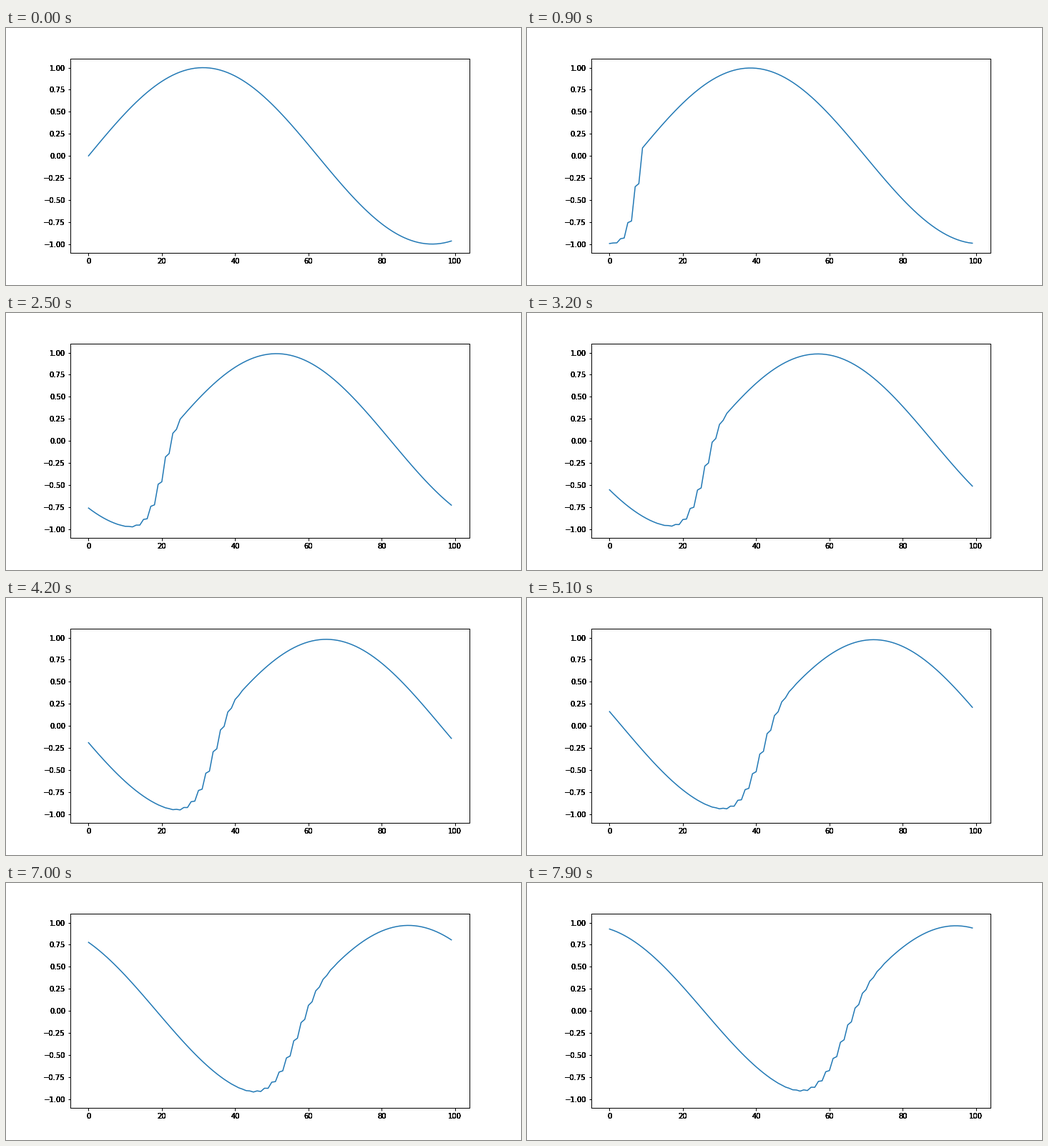
A matplotlib script for the animation above (8000 ms loop, 720 px wide and 360 px high).

```python
import matplotlib.pyplot as plt
import numpy as np
from matplotlib.animation import FuncAnimation

N = 100          # grid points, periodic
FRAMES = 80
COURANT = 0.8
LABEL_PASSES = 7  # repeated drawing gives the labels their hard, dark edges


def lax_friedrichs(u):
    """Advance the advection equation by one time step."""
    left, right = np.roll(u, 1), np.roll(u, -1)
    return (left + right) / 2 - COURANT / 2 * (right - left)


def dark_label(ax, text, xy, coords, offset, ha, va):
    for _ in range(LABEL_PASSES):
        ax.annotate(text, xy, xycoords=coords, xytext=offset,
                    textcoords="offset points", ha=ha, va=va,
                    annotation_clip=False)


plt.rcParams.update({"font.family": "DejaVu Sans", "font.size": 10,
                     "axes.linewidth": 1.0})

x = np.arange(N)
states = [np.sin(2 * np.pi * 0.8 * x / N)]
for _ in range(FRAMES - 1):
    states.append(lax_friedrichs(states[-1]))

fig = plt.figure(figsize=(10, 5), dpi=72, facecolor="white")
fig.subplots_adjust(left=0.125, right=0.9, bottom=0.125, top=0.88)
ax = fig.add_subplot()
line, = ax.plot(x, states[0], color="#1f77b4", lw=1.5)

ax.set_xlim(-4.95, 103.95)
ax.set_ylim(-1.1, 1.1)
x_ticks = np.arange(0, 101, 20)
y_ticks = np.linspace(-1, 1, 9)
ax.set_xticks(x_ticks)
ax.set_yticks(y_ticks)
ax.tick_params(width=1.0, length=3.5, labelbottom=False, labelleft=False)

for t in x_ticks:
    dark_label(ax, str(t), (t, 0), ax.get_xaxis_transform(),
               (0, -7), "center", "top")
for t in y_ticks:
    dark_label(ax, f"{t:.2f}".replace("-", "\u2212"), (0, t),
               ax.get_yaxis_transform(), (-7, 0), "right", "center_baseline")


def update(i):
    line.set_ydata(states[i])
    return line,


anim = FuncAnimation(fig, update, frames=FRAMES, interval=100,
                     repeat=True, repeat_delay=0)
plt.show()
```
